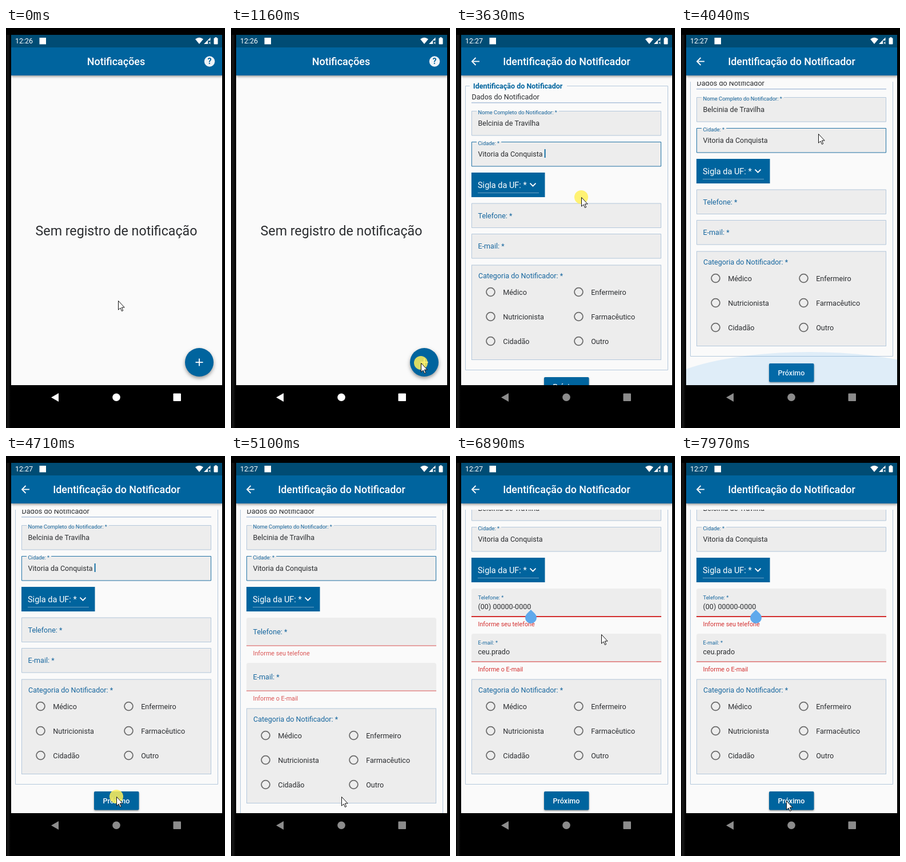
An HTML page with a canvas that plays this animation: 383x700 px, repeating every 8 s.

```html
<!DOCTYPE html>
<html lang="pt">
<head>
<meta charset="utf-8">
<style>
html, body { margin: 0; width: 100%; height: 100%; overflow: hidden; background: #000; }
canvas { display: block; width: 383px; height: 700px; }
</style>
</head>
<body>
<canvas id="stage"></canvas>
<script>
const LOOP = 8000, BLUE = '#00649e', LABEL = '#17679f', INK = '#2b2d30';
const BOX = '#ededed', EDGE = '#b4c8dc', RED = '#d32f2f';
const canvas = document.getElementById('stage');
const dpr = window.devicePixelRatio || 1;
canvas.width = 383 * dpr;
canvas.height = 700 * dpr;
const c = canvas.getContext('2d');

const between = (t, a, b) => t >= a && t < b;
const progress = (t, a, b) => Math.min(1, Math.max(0, (t - a) / (b - a)));
const ease = (t, a, b) => { const p = progress(t, a, b); return p * p * (3 - 2 * p); };

// Pointer keys: time, x, y
const POINTER = [
  [0, 196, 477], [230, 196, 477], [1080, 332, 586], [2629, 332, 586], [2630, 328, 586],
  [3080, 328, 586], [3630, 219, 296], [3680, 219, 294], [3960, 240, 185], [4060, 240, 185],
  [4560, 193, 596], [6889, 193, 596], [6890, 254, 312], [7500, 190, 633],
  [7780, 182, 603], [7969, 182, 603], [7970, 184, 603], [8000, 184, 603]
];

function pointerAt(t) {
  const i = POINTER.findIndex(key => key[0] > t);
  const [t0, x0, y0] = POINTER[i - 1], [t1, x1, y1] = POINTER[i];
  const p = ease(t, t0, t1);
  return [x0 + (x1 - x0) * p, y0 + (y1 - y0) * p];
}

function rect(x, y, w, h, color, radius = 0) {
  c.fillStyle = color;
  c.beginPath();
  c.roundRect(x, y, w, h, radius);
  c.fill();
}

function disc(x, y, r, color) {
  c.fillStyle = color;
  c.beginPath();
  c.arc(x, y, r, 0, 7);
  c.fill();
}

function line(points, color, width = 1, closed = false) {
  c.strokeStyle = color;
  c.lineWidth = width;
  c.beginPath();
  points.forEach(([x, y]) => c.lineTo(x, y));
  if (closed) c.closePath();
  c.stroke();
}

function shape(points, color) {
  c.fillStyle = color;
  c.beginPath();
  points.forEach(([x, y]) => c.lineTo(x, y));
  c.fill();
}

// y is the middle of the capitals
function text(s, x, y, size, color, weight = 400, align = 'left') {
  c.font = `${weight} ${size}px Roboto, sans-serif`;
  c.textAlign = align;
  c.fillStyle = color;
  c.fillText(s, x, y + size * 0.355);
}

function shadowed(draw, blur, dy, alpha) {
  c.save();
  c.shadowColor = `rgba(0,0,0,${alpha})`;
  c.shadowBlur = blur * dpr;
  c.shadowOffsetY = dy * dpr;
  draw();
  c.restore();
}

function outlinedField(y, label, value, edge = EDGE) {
  rect(27, y, 332, 43.5, BOX, 1);
  let left = 36, right = 36;
  if (value) {
    text(label, 38.5, y + 2.2, 9.4, LABEL);
    right = 41.5 + c.measureText(label).width;
    text(value, 38.5, y + 21.3, 12.56, INK);
  } else {
    text(label, 38.5, y + 22, 12.56, LABEL);
  }
  const top = y + 0.5, bottom = y + 43;
  line([[right, top], [358.5, top], [358.5, bottom], [27.5, bottom], [27.5, top], [left, top]], edge);
}

function errorField(y, label, value, message, grow, fade, thick) {
  const h = 43.5 + 5.5 * grow;
  rect(27, y, 332, h, BOX, [3.5, 3.5, 0, 0]);
  if (value) {
    text(label, 38.5, y + 16, 9.4, LABEL);
    text(value, 38.5, y + 31.3, 12.56, INK);
  } else {
    text(label, 38.5, y + 22 + 2.5 * grow, 12.56, LABEL);
  }
  c.globalAlpha = fade;
  rect(27, y + h - thick / 2, 332, thick, RED);
  text(message, 38.5, y + h + 13, 10.78, RED);
  c.globalAlpha = 1;
}

function drawHome() {
  text('Sem registro de notificação', 193, 354.5, 23.2, INK, 400, 'center');
  shadowed(() => disc(338, 585, 25, BLUE), 6, 3, 0.4);
  line([[331.5, 585], [344.5, 585]], '#fff', 1.8);
  line([[338, 578.5], [338, 591.5]], '#fff', 1.8);
}

function drawForm(t) {
  const filled = t >= 2940, typed = t >= 6890;
  const errors = ease(t, 4780, 5030), grown = 51 * errors;
  const scroll = typed ? 75 : 24 * ease(t, 3680, 3870);

  c.save();
  c.beginPath();
  c.rect(9, 94, 369, 531);
  c.clip();
  c.translate(0, -scroll);

  const end = 598.5 + grown;
  line([[24, 101.5], [16.5, 101.5], [16.5, end], [370.5, end], [370.5, 101.5], [194, 101.5]], EDGE);
  text('Identificação do Notificador', 30, 101.5, 12.5, BLUE, 700);
  text('Dados do Notificador', 27.5, 120.5, 12.56, INK);
  rect(27, 130, 332, 1.6, '#afc3dc');

  outlinedField(145, 'Nome Completo do Notificador: *', filled && 'Belcinia de Travilha');
  outlinedField(199, 'Cidade: *', filled && 'Vitoria da Conquista', filled && !typed ? '#2273a6' : EDGE);
  if (filled && !typed && (t - 2400) % 1005 < 460) rect(154.7, 212, 1.8, 15, BLUE);

  rect(27, 253, 128.5, 43, BLUE);
  text('Sigla da UF: *', 38, 274.5, 14.5, '#fff');
  line([[129.5, 271.7], [134.5, 276.7], [139.5, 271.7]], '#fff', 1.8);
  rect(38, 288, 107, 1, '#6d9fc2');

  if (errors) {
    const fade = typed ? 1 : 0.82 * errors;
    errorField(307, 'Telefone: *', typed && '(00) 00000-0000', 'Informe seu telefone', errors, fade, typed ? 2 : 1.2);
    errorField(360.5 + 25.5 * errors, 'E-mail: *', typed && 'ceu.prado', 'Informe o E-mail', errors, fade, 1.2);
  } else {
    outlinedField(306.5, 'Telefone: *');
    outlinedField(360, 'E-mail: *');
  }

  c.translate(0, grown);
  rect(27, 414.5, 332, 166.5, BOX);
  c.strokeStyle = EDGE;
  c.lineWidth = 1;
  c.strokeRect(27.5, 415, 331, 165.5);
  text('Categoria do Notificador: *', 39, 433.5, 12.56, LABEL);
  ['Médico', 'Enfermeiro', 'Nutricionista', 'Farmacêutico', 'Cidadão', 'Outro'].forEach((name, i) => {
    const x = 60.5 + 154 * (i % 2), y = 462 + 43 * Math.floor(i / 2);
    c.strokeStyle = '#6c6c6c';
    c.lineWidth = 1.8;
    c.beginPath();
    c.arc(x, y, 7.4, 0, 7);
    c.stroke();
    text(name, x + 21.7, y + 0.3, 12.6, INK);
  });
  shadowed(() => rect(154, 611, 78.5, 32.5, BLUE, 2), 3, 1.5, 0.4);
  text('Próximo', 193, 627.6, 12.56, '#fff', 500, 'center');
  c.translate(0, -grown);

  if (typed) {
    if (between(t, 7310, 7810)) rect(130.3, 330, 1.6, 15, BLUE);
    c.fillStyle = '#5ea9ec';
    c.beginPath();
    c.moveTo(131, 344);
    c.arc(131, 358, 10, -Math.PI / 4, Math.PI * 1.25);
    c.fill();
  }
  c.restore();

  const glow = ease(t, 3760, 3960) * (1 - ease(t, 4060, 4480));
  if (glow) {
    c.save();
    c.beginPath();
    c.rect(9, 83, 369, 542);
    c.clip();
    c.fillStyle = `rgba(30,136,229,${0.12 * glow})`;
    c.beginPath();
    c.ellipse(225, 625 + 22 * glow, 277, 80 * glow, 0, 0, 7);
    c.fill();
    c.restore();
  }
}

function drawBars(t) {
  const home = t < 2170;
  shadowed(() => rect(9, 34, 369, 49, BLUE), 4, 1.5, 0.4);
  rect(0, 0, 383, 12, '#000');
  rect(0, 12, 9, 613, '#000');
  rect(378, 12, 5, 613, '#000');
  rect(9, 12, 369, 22, '#004c74');

  text(t < 2940 ? '12:26' : '12:27', 16, 23, 12.5, '#fff');
  rect(58.5, 17, 11.5, 11.5, '#fff');
  c.fillStyle = '#fff';
  c.beginPath();
  c.moveTo(338, 28);
  c.lineTo(331, 19.5);
  c.quadraticCurveTo(338, 14, 345, 19.5);
  c.fill();
  shape([[346, 28], [357.5, 16.5], [357.5, 22], [353, 22], [353, 28]], '#fff');
  line([[354.5, 24], [358, 28]], '#fff');
  line([[358, 24], [354.5, 28]], '#fff');
  rect(363.5, 17.5, 7, 11, '#fff', 1);
  rect(365.5, 16.2, 3, 2, '#fff');

  if (home) {
    text('Notificações', 192.5, 59, 17.9, '#fff', 500, 'center');
    disc(356, 58.5, 9.2, '#eef3f7');
    text('?', 356, 58.5, 14, BLUE, 700, 'center');
  } else {
    text('Identificação do Notificador', 193.5, 59, 17.9, '#fff', 500, 'center');
    line([[41, 58.5], [28.5, 58.5]], '#fff', 1.8);
    line([[34.5, 52], [28, 58.5], [34.5, 65]], '#fff', 1.8);
  }

  rect(0, 625, 383, 75, '#000');
  const nav = t < 2940 ? '#fff' : '#8c8c8c';
  shape([[79, 646.5], [92, 639], [92, 654]], nav);
  disc(193, 646.3, 6.8, nav);
  rect(292.5, 639.5, 13.5, 13.5, nav, 1);

  const bezel = c.createLinearGradient(0, 0, 8, 0);
  bezel.addColorStop(0, '#000');
  bezel.addColorStop(0.4, '#191919');
  bezel.addColorStop(1, '#000');
  rect(0, 12, 8, 688, bezel);
}

function drawPointer(t) {
  const [x, y] = pointerAt(t);
  const pressed = between(t, 1160, 1240) || between(t, 3580, 3940) || between(t, 4710, 4790);
  if (pressed) disc(x, y, 12, 'rgba(255,240,90,0.85)');
  const arrow = [[0.5, 0.5], [0.5, 16.2], [4, 12.9], [6.5, 18.5], [8.7, 17.5], [6.3, 12], [11.2, 12]]
    .map(([dx, dy]) => [x + dx, y + dy]);
  shape(arrow, '#fff');
  line(arrow, '#111', 1, true);
}

function draw(now) {
  const t = now % LOOP;
  c.setTransform(dpr, 0, 0, dpr, 0, 0);
  rect(0, 0, 383, 700, '#000');
  rect(9, 12, 369, 613, '#fafafa');
  if (t < 2170) drawHome();
  else drawForm(t);
  drawBars(t);
  drawPointer(t);
}

const start = performance.now();
function tick() {
  draw(performance.now() - start);
  requestAnimationFrame(tick);
}
tick();
</script>
</body>
</html>
```
